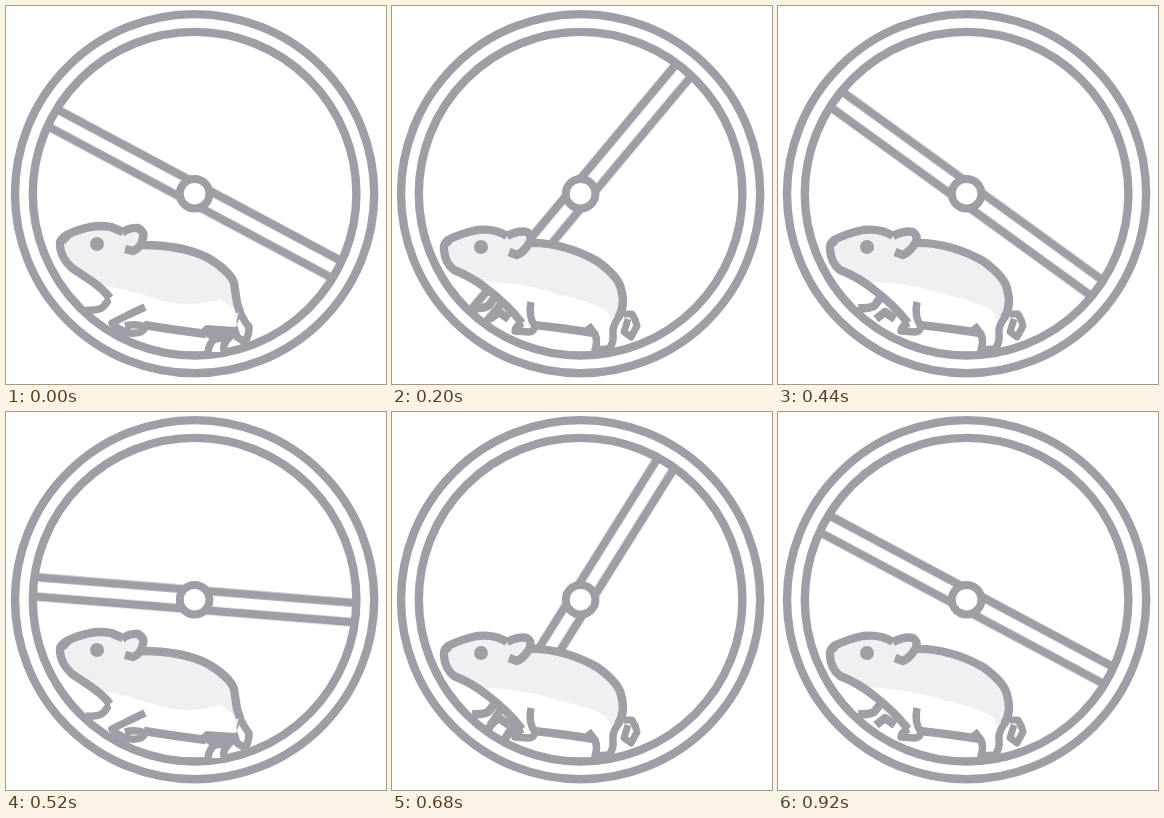
Write an HTML page that moves like this. It is 380 px wide and 378 px high and loops after 0.96 s.

```html
<!DOCTYPE html>
<html lang="en">
<head>
<meta charset="utf-8">
<title>Hamster wheel</title>
<style>
  html, body { margin: 0; width: 100%; height: 100%; overflow: hidden; background: #fff; }
  svg { display: block; width: 380px; height: 378px; }
  svg * { --ink: #9f9ea6; }
  .line, .limb, .ear { stroke: var(--ink); stroke-width: 8.4; stroke-linejoin: round; }
  .line { fill: none; }
  .limb { fill: #fff; stroke-width: 7.5; }
  .fur, .ear { fill: #f0f0f2; }
  .belly { fill: #fff; }
  .eye, .shade { fill: var(--ink); }

  .spoke {
    transform-origin: 188.6px 187.7px;
    animation: spin 960ms steps(24, jump-none) infinite;
  }
  @keyframes spin {
    from { transform: rotate(28.1deg); }
    to { transform: rotate(-331.9deg); }
  }

  /* three strides of 80 ms each */
  .pose { visibility: hidden; animation: stride 240ms step-end infinite; }
  .reach { animation-delay: 0ms; }
  .push { animation-delay: -160ms; }
  .tuck { animation-delay: -80ms; }
  @keyframes stride {
    0% { visibility: visible; }
    33.333%, 100% { visibility: hidden; }
  }
</style>
</head>
<body>
<svg viewBox="0 0 380 378">
  <g class="spoke">
    <path class="line" d="M27.5 178H349.7M27.5 197.4H349.7"/>
  </g>
  <circle class="line" cx="188.6" cy="187.7" r="179.6"/>
  <circle class="line" cx="188.6" cy="187.7" r="161.8"/>
  <circle class="limb" cx="188.6" cy="187.7" r="14.8" style="stroke-width:8"/>

  <g class="pose reach">
    <path class="limb" d="M104 292L98 300Q94 305 80 304"/>
    <path class="limb" d="M233 304Q238 315 243 321Q243 330 239 336L231 331L227 318Z"/>
    <path class="limb" d="M202 346Q203 337 209 333L224 331Q216 337 218 346"/>
    <path class="fur" d="M60 231C68 224 77 223 84 221Q95 219 105 221L117 226L136 239C165 239 185 243 202 252C216 260 226 270 228 277L233 305L228 326L197 328Q168 324 141 319L112 314L104 292Q95 280 84 274L66 262Q52 250 54 238Q55 233 60 231Z"/>
    <path class="belly" d="M93 279Q125 284 150 293Q182 303 214 293L228 303L231 320L197 328Q168 324 141 319L112 314L104 292Z"/>
    <path class="limb" d="M139 301L122 309L106 317Q113 325 124 327Q137 328 139 321Q131 317 119 320"/>
    <path class="shade" d="M193 325L200 319L229 321L231 331L203 333Z"/>
    <path class="line" d="M62 235L58 231C68 224 77 223 84 221Q95 219 105 221L117 226"/>
    <path class="line" d="M59 231Q53 234 54 240Q55 252 66 262L84 274Q96 282 104 292"/>
    <path class="line" d="M135 239C165 239 185 243 202 252C216 260 226 270 228 277L231 297L234 306M138 319Q168 324 200 328"/>
    <path class="ear" d="M116 227Q123 221 132 222Q139 226 137 232Q135 242 127 245L119 243"/>
    <circle class="eye" cx="91" cy="238" r="7"/>
  </g>

  <g class="pose push">
    <path class="fur" d="M64 234Q76 227 92 224Q106 223 121 230L142 242C165 240 190 245 212 256Q232 270 236 283Q241 300 236 315L220 327L200 326Q160 321 127 318L113 305L99 288L72 265Q57 254 59 242Q60 237 64 234Z"/>
    <path class="belly" d="M95 280Q140 280 180 291Q205 296 224 306L220 327L200 326Q160 321 127 318L113 305Z"/>
    <path class="limb" d="M112 304Q113 314 106 322Q113 327 120 327Q121 320 127 316L146 302"/>
    <path class="limb" d="M238 308Q236 318 238 328Q238 335 234 339L216 340Q218 334 223 331L221 321"/>
    <path class="shade" d="M195 325L201 318L219 322L224 332L208 330Z"/>
    <path class="line" d="M67 238L63 234Q76 227 92 224Q106 223 121 230"/>
    <path class="line" d="M64 234Q58 237 59 244Q60 256 72 265L88 277Q102 288 113 305"/>
    <path class="line" d="M140 242C165 240 190 245 212 256Q232 270 236 283Q241 300 236 315M125 318Q160 321 203 327"/>
    <path class="ear" d="M120 230Q128 225 137 226Q144 230 143 235Q140 246 133 249L124 247"/>
    <circle class="eye" cx="95.5" cy="242" r="7"/>
  </g>

  <g class="pose tuck">
    <path class="line" d="M103 291L97 299Q93 303 80 302M98 313L107 306L117 313"/>
    <path class="limb" d="M232 308L240 308Q244 314 245 320L239 331L232 326L236 313" style="stroke-width:7"/>
    <path class="fur" d="M57 234Q70 227 85 224Q103 222 115 230L136 237C155 236 180 241 205 255Q227 271 229 283Q233 300 226 312L218 326L200 326L143 319L130 318L95 283Q80 271 62 264Q51 254 52 240Q53 236 57 234Z"/>
    <path class="belly" d="M85 275Q135 277 168 289Q195 294 214 304L222 318L200 326L143 319L130 318L95 283Z"/>
    <path class="limb" d="M139 296Q136 311 143 320Q142 326 137 326L123 325Q123 320 131 317"/>
    <path class="limb" d="M227 311Q220 320 221 328Q222 337 217 343L203 344Q206 335 203 328L196 319"/>
    <path class="line" d="M60 237L56 234Q70 227 85 224Q103 222 115 230"/>
    <path class="line" d="M57 234Q51 237 52 244Q53 257 62 264Q80 271 95 283Q116 299 130 317"/>
    <path class="line" d="M134 237C155 236 180 241 205 255Q227 271 229 283Q234 300 226 312M142 319Q170 322 202 327"/>
    <path class="ear" d="M115 230Q127 224 135 226Q140 229 138 236Q132 246 125 249L117 246"/>
    <circle class="eye" cx="89" cy="241" r="7"/>
  </g>
</svg>
</body>
</html>
```
